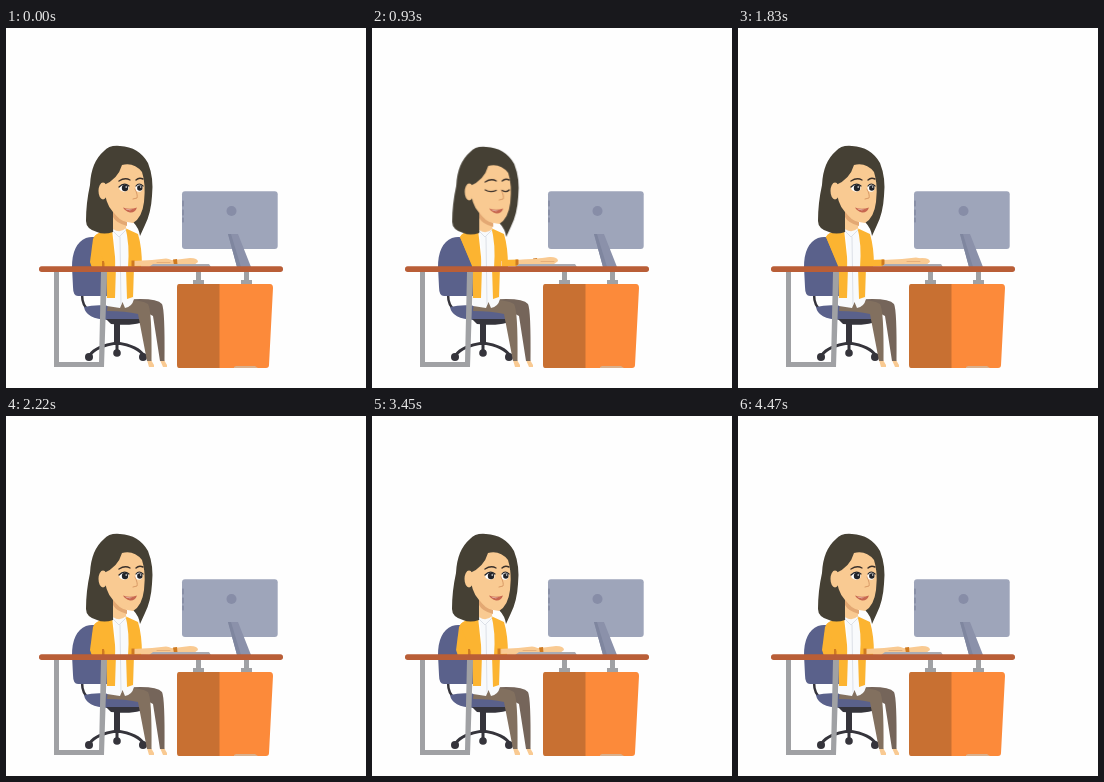
An HTML page for the animation above (4.5 s loop, 360 by 360 pixels).

```html
<!DOCTYPE html>
<html lang="en">
<head>
<meta charset="utf-8">
<title>Typing at the desk</title>
<style>
  html, body { margin: 0; width: 100%; height: 100%; overflow: hidden; background: #fefefe; }
  svg { display: block; width: 100vw; height: 100vh; }

  .skin { fill: #f9ca92; }
  .hair { fill: #454034; }
  .chair { fill: #5a618b; }
  .dark { fill: #35343b; }
  .jacket { fill: #fcb431; }
  .shirt { fill: #f8fafc; }
  .cuff { fill: #cf7a20; }
  .steel { fill: #a0a1a4; }
  .line { fill: none; stroke-linecap: round; stroke-linejoin: round; }

  /* eight strokes of the keys per loop */
  .near, .sleeve, .far { animation: .5625s ease-in-out infinite; }
  .near { animation-name: reach; }
  .sleeve { animation-name: bend; }
  .far { animation-name: pull; }
  .head, .open, .shut { animation: 4.5s infinite; }
  .head { animation-name: nod; animation-timing-function: ease-in-out; }
  .open { animation-name: open; animation-timing-function: step-end; }
  .shut { animation-name: shut; animation-timing-function: step-end; }

  @keyframes nod {
    0%, 12%, 28%, 100% { transform: none; }
    20.7% { transform: translate(.2px, .9px); }
  }
  @keyframes reach {
    0%, 13%, 95%, 100% { transform: none; }
    25%, 70% { transform: translate(18px, -1px); }
  }
  @keyframes bend {
    0%, 13%, 95%, 100% { d: path("M99 203Q89 205 87 211L84 234L86 240L101 240L107 215Z"); }
    25%, 70% { d: path("M99 203Q90 204 88 209L98 232L102 240L108 240L107 215Z"); }
  }
  @keyframes pull {
    0%, 25%, 90%, 100% { transform: none; }
    35%, 65% { transform: translate(-6px, -1px); }
  }
  @keyframes open {
    0%, 22.7% { visibility: visible; }
    18.7% { visibility: hidden; }
  }
  @keyframes shut {
    0%, 22.7% { visibility: hidden; }
    18.7% { visibility: visible; }
  }
</style>
</head>
<body>
<svg viewBox="0 0 360 360">
  <!-- chair -->
  <g>
    <path class="line" d="M76 266Q76 279 84 283" stroke="#35343b" stroke-width="2.5"/>
    <path class="chair" d="M80 210Q90 207 101 214L101 268H72Q67 268 67 259L66 239Q66 216 80 210Z"/>
    <path class="chair" d="M78 279Q90 276 105 278L130 283Q136 286 134 291Q121 293 102 292Q80 291 78 279Z"/>
    <path class="dark" d="M100 291H134V295Q124 298 105 296ZM108 296H114V316H108Z"/>
    <path class="line" d="M84 327Q90 318 111 315Q132 318 138 328M111 315V323" stroke="#35343b" stroke-width="3"/>
    <g class="dark">
      <circle cx="83" cy="329" r="4"/>
      <circle cx="111" cy="325" r="3.8"/>
      <circle cx="137" cy="329" r="4"/>
    </g>
  </g>

  <!-- legs -->
  <path class="skin" d="M141 332H145L148 337V339H143ZM154 332H158L161 337V339H157Z"/>
  <path d="M117 272Q150 269 156 276Q159 282 158.500 333H154L147 288Z" fill="#75655a"/>
  <path d="M102 275Q130 269 142 276Q146 282 145.500 333H141L132 286Q120 283 101 283Z" fill="#82705f"/>

  <!-- torso -->
  <path class="shirt" d="M101 236H128V271Q126 279 119 280L116.500 274L114 280L101 278Z"/>
  <path class="sleeve jacket" d="M99 203Q89 205 87 211L84 234L86 240L101 240L107 215Z"/>
  <g class="near"><path class="cuff" d="M96 233H98.500V239H96Z"/></g>
  <path class="jacket" d="M106 201Q92 204 88 209L100 238L101 270H109L110 238Z"/>
  <path class="jacket" d="M119 200L132 206Q136 219 136 239H128L127 269L121 271L120 239Z"/>

  <!-- arms -->
  <g class="far">
    <path class="skin" d="M135 234L168 232L184 230Q192 230 192 234L188 237L135 239Z"/>
    <path class="cuff" d="M167 231.5L171 231L171.500 237H168Z"/>
  </g>
  <g class="near">
    <path class="skin" d="M127 233L146 232L160 230.500Q166 231 167 234L161 237L128 238Z"/>
    <path class="line" d="M151 234.500L164 234.500" stroke="#dfa36e" stroke-width=".7"/>
    <path class="jacket" d="M112 233L128 232.500V239H112Z"/>
    <path class="cuff" d="M125.500 232.500H128.500V238.500H125.500Z"/>
  </g>
  <path class="shirt" d="M106 198H119Q124 216 122 240H109Q111 216 106 198Z"/>
  <path class="line" d="M114 209L115 276M106 202L113 209L120 202" stroke="#dce0e7" stroke-width="1"/>

  <!-- head -->
  <g class="head">
    <path class="hair" d="M98 123Q103 117 114 118Q133 119 142 135Q148 150 146 168Q145 185 139 197L134 208Q133 200 127 194L108 184L107 204Q98 207 91 204Q80 201 80 193Q80 175 84 157Q85 134 98 123Z"/>
    <path class="skin" d="M107 178L121 188L120 200Q114 206 107 201Z"/>
    <path d="M107 183Q113 193 121 194V198Q110 195 107 189Z" fill="#e3a873"/>
    <ellipse class="skin" cx="97" cy="163" rx="4.500" ry="8.500"/>
    <path class="skin" d="M116 137Q128 134 136 144Q140 156 138 174Q136 190 127 195Q117 195 107 184Q99 176 98 157Q112 151 116 137Z"/>
    <path class="line" d="M113 153Q119 149 124 152M130 152Q133 149 137 151" stroke="#3a302a" stroke-width="1.400"/>
    <path class="line" d="M129 161Q132 167 131 170L127 171" stroke="#d99a66" stroke-width="1"/>
    <path d="M117 179.500Q124 182 131 179.500Q129 185 124 184.500Q119 183 117 179.500Z" fill="#c7664f"/>
    <path d="M119 180.500Q125 183 130 180.500Q123 184 119 180.500Z" fill="#fff3ec"/>
    <g class="open">
      <ellipse cx="118" cy="160" rx="4.800" ry="3.700" fill="#fff"/>
      <ellipse cx="133" cy="160" rx="3.500" ry="3.700" fill="#fff"/>
      <g fill="#22242a">
        <circle cx="119" cy="160" r="3.200"/>
        <circle cx="133.800" cy="160" r="2.700"/>
      </g>
      <path class="line" d="M113 159Q118 154 123 158M130 158Q133 154 137 158" stroke="#22242a" stroke-width="1.200"/>
      <circle cx="120.200" cy="159" r=".8" fill="#fff"/>
      <circle cx="134.700" cy="159" r=".7" fill="#fff"/>
    </g>
    <path class="line shut" d="M113 161Q118 164 124 161.500M130 161.500Q134 164 137 161" stroke="#3a302a" stroke-width="1.300"/>
  </g>

  <!-- computer -->
  <rect x="176" y="163.300" width="95.700" height="57.700" rx="3" fill="#9ea5ba"/>
  <path class="line" d="M177 173V178M177 182V187M177 190V194" stroke="#747a93" stroke-width="1"/>
  <circle cx="225.500" cy="183" r="5" fill="#878da7"/>
  <path d="M222 206H232L245 239H231Z" fill="#8b91aa"/>
  <path d="M222 206H225L235 239H231Z" fill="#7f869f"/>
  <path d="M147 236H203L205 239H143Z" fill="#a9abb3"/>

  <!-- desk -->
  <g class="steel">
    <path d="M48 244H53V334H93L95 244H101L98 339H48Z"/>
    <path d="M190 244H195V252H198V256H187V252H190ZM238 244H243V252H246V256H235V252H238Z"/>
  </g>
  <path d="M173 256H214V340H173Q171 340 171 337V259Q171 256 173 256Z" fill="#c87032"/>
  <path d="M213.500 256H264Q267 256 267 260L263 337Q263 340 260 340H213.500Z" fill="#fc8a3a"/>
  <path d="M228 339L230 338H249L252 340H228Z" fill="#d9b08c"/>
  <rect x="33" y="238.300" width="244" height="5.700" rx="2.700" fill="#b95e37"/>
</svg>
</body>
</html>
```
